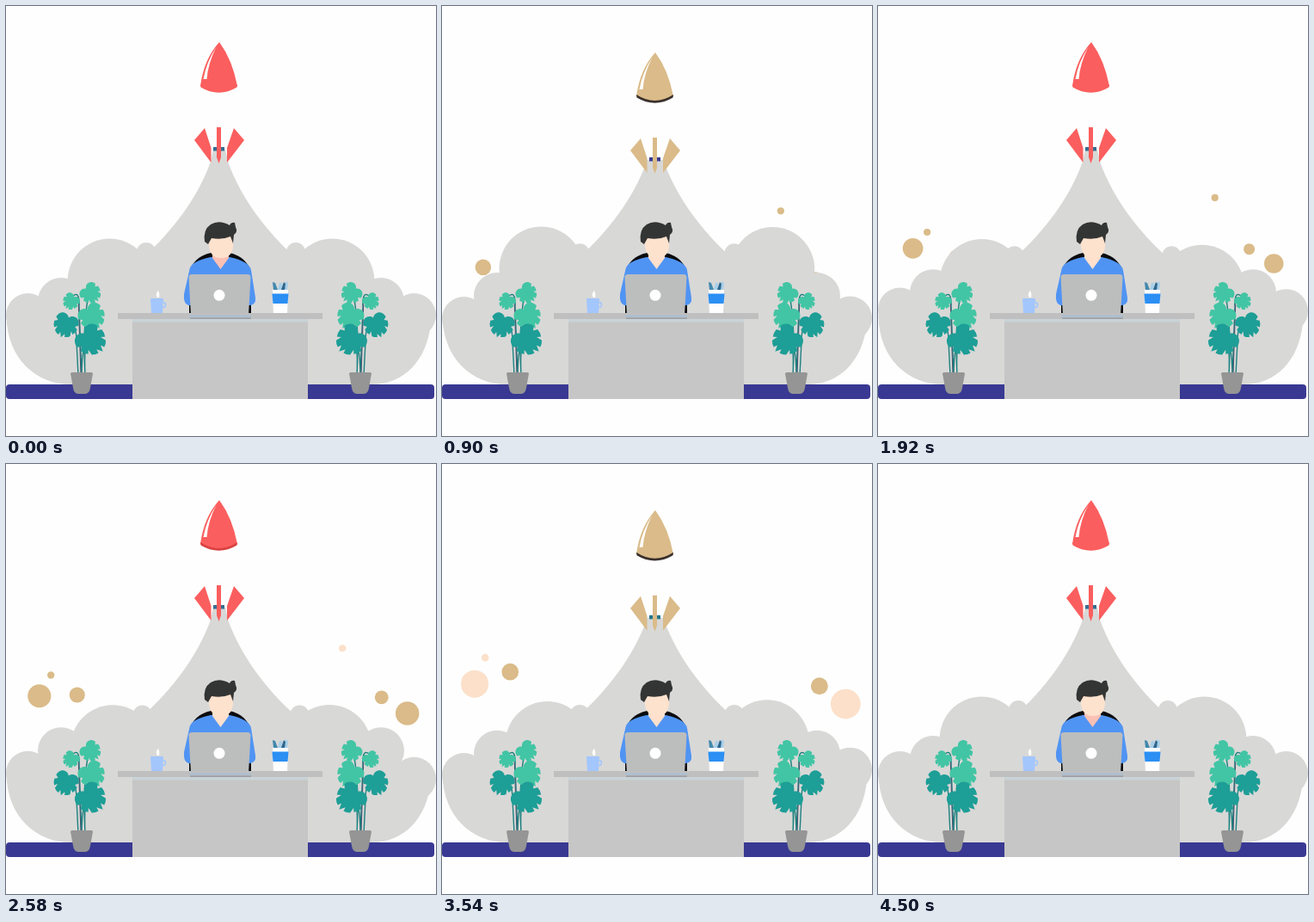
Recreate the animation shown at these times as an HTML page. Size 500 by 500 pixels, loop 4530 ms.

```html
<!DOCTYPE html>
<html lang="en">
<head>
<meta charset="utf-8">
<title>Rocket over a desk</title>
<style>
html, body { margin: 0; width: 100%; height: 100%; overflow: hidden; background: #fefefe; }
svg { display: block; width: 100vw; height: 100vh; }
</style>
</head>
<body>
<svg viewBox="0 0 500 500">
  <defs>
    <path id="leaf" d="M0-.65C-.25-1.05-.9-1-1-.35L-.75-.15-1.02 0Q-1 .3-.82 .52L-.6 .32-.68 .72Q-.5 .92-.28 .96L-.2 .7 0 1.1 .2 .7 .28 .96Q.5 .92 .68 .72L.6 .32 .82 .52Q1 .3 1.02 0L.75-.15 1-.35C.9-1 .25-1.05 0-.65Z"/>
    <g id="plant">
      <g fill="none" stroke="#1d807e" stroke-width="1.4">
        <path d="M96 336Q89 370 92 430M78 337Q86 331 85 350L88 430M98 362Q90 390 92 430M70 366Q82 366 82 390L84 430M97 385Q88 392 88 430"/>
        <path stroke="#43506d" stroke-width="1" d="M84 338L87 430"/>
      </g>
      <g fill="#42c5a4">
        <use href="#leaf" transform="translate(98.5 334) rotate(-45) scale(11.8)"/>
        <use href="#leaf" transform="translate(75.5 343.5) rotate(35) scale(9.4)"/>
        <use href="#leaf" transform="translate(100 361) rotate(-32) scale(15)"/>
      </g>
      <g fill="#1d9e96">
        <use href="#leaf" transform="translate(69.5 371) rotate(22) scale(14)"/>
        <use href="#leaf" transform="translate(99 388.5) rotate(-46) scale(17.2)"/>
      </g>
      <path fill="#959595" d="M75 427.500Q75 426 77 426H99Q101 426 101 427.500L98 444Q97 451 92 451H84Q79 451 78 444Z"/>
    </g>
  </defs>

  <g id="bubbles"></g>

  <g fill="#d8d8d7">
    <path d="M241 166H255L258 181C274 225 303 262 336 292V335H160V292C193 262 222 225 238 181Z"/>
    <path d="M.5 360C1 410 35 440 75 440H425C463 440 490 412 494 368L475 352 436 337 378 310 330 296H168L122 310 64 337 25 352Z"/>
    <g id="clouds"></g>
  </g>

  <g id="rocket">
    <rect x="236" y="100" width="24" height="67" fill="#fefefe"/>
    <rect id="nozzle" x="241" y="164" width="13" height="4.500"/>
    <g id="paint">
      <path d="M248 42Q230 62 226 93Q236 100 248 100Q260 100 269 93Q263 62 248 42Z"/>
      <path d="M231 142L219 156 238.500 182V165ZM265 142L277 156 257 182V165ZM245 141H250V176L247.500 183 245 176Z"/>
    </g>
    <path id="rim" d="M226 91Q247.500 105 269 91L268.500 94.500Q247.500 107 226.500 94.500Z"/>
    <path fill="#fefefe" d="M244.500 48Q233 65 229.500 85H233.500Q235 66 244.500 48Z"/>
  </g>

  <rect y="440" width="498" height="17" rx="4" fill="#393993"/>
  <use href="#plant"/>
  <use href="#plant" transform="matrix(-1 0 0 1 500 0)"/>

  <path fill="#0b0b0d" d="M213 357V312C217 277 281 277 285 312V357Z"/>
  <path fill="#5094f3" d="M238 292Q215 297 213.500 306L207 335Q206 346 212 348H284Q291 347 290 339L285 307Q283 297 260 292Z"/>
  <path id="neck" d="M240 286H259V293L249.500 306 240 293Z"/>
  <path fill="#fde2ce" d="M235 268H264V279Q263 293 250 293Q238 293 236 280Z"/>
  <path fill="#333534" d="M231 274Q229 260 238 254Q248 248 260 255Q262 251 266 252L267 257Q270 263 265 266L264 276 261 268Q252 272 239 270L235 277Z"/>
  <path fill="#bcbdbd" d="M216 312H281Q284 312 284.500 315L282 360H215L212.500 315Q213 312 216 312Z"/>
  <circle cx="248" cy="336.300" r="6.500" fill="#fff"/>

  <path fill="#fefefe" d="M176 339Q173 335 177 331Q179 334 178 339Z"/>
  <circle cx="182.500" cy="347.500" r="3" fill="none" stroke="#a3c6fd" stroke-width="1.500"/>
  <path fill="#a3c6fd" d="M168 340H183L182 357H169Z"/>

  <path fill="#4389ad" d="M311 330L310 321 313 322 316 330Z"/>
  <path fill="#a9cfe9" d="M316 330L318 322 321 322 322 330ZM323 330L325 320 328 322 327 330Z"/>
  <path fill="#2e668e" d="M320 330L323 321 325 323 324 330Z"/>
  <path fill="#fefefe" d="M310 330H328L327 359H311Z"/>
  <path fill="#2b8ff3" d="M309.500 334.500H328.500L327.500 346H310.500Z"/>

  <rect x="130" y="357" width="238" height="7" fill="#bfbfbf"/>
  <rect x="147" y="364" width="204" height="93" fill="#c6c6c6"/>
  <rect x="147" y="364" width="204" height="3.500" fill="#c9d3d7"/>
  <rect x="213" y="359.500" width="72" height="2" fill="#a7bfd5"/>
  <rect x="214" y="362.500" width="71" height="1.200" fill="#8f9499"/>
</svg>
<script>
const LOOP = 4530, STEP = 30, SPAN = 4500, FADE = 1900;
const RED = '#fb5e5e', TAN = '#dabb89', PEACH = '#fce0ca';
const $ = id => document.getElementById(id);
const clamp = v => Math.min(1, Math.max(0, v));
const ease = p => (1 - Math.cos(Math.PI * clamp(p))) / 2;
const mix = (a, b, p) => a + (b - a) * p;
const arc = t => Math.sin(Math.PI * t / SPAN);

// Falls to -14 at the crest, climbs to 10 at three crests, then settles at 0.
function heave(t, crest) {
  const low = 3 * crest;
  return -14 * ease(t / crest) + 24 * ease((t - crest) / (low - crest)) - 10 * ease((t - low) / (SPAN - low));
}

// Each puff sits `x` from the middle, its top at `y`; move gives [outward, down].
const puffs = [
  { x: 129.5, y: 270.5, r: 48.8, move: (t, crest) => [-0.37 * heave(t, crest), heave(t, crest)] },
  { x: 87, y: 275, r: 11, move: t => [4.5 * arc(t), 10 * arc(t) * t / SPAN] },
  { x: 186, y: 316, r: 27, move: t => [0, -10 * arc(t)] },
  { x: 224.5, y: 334, r: 25.5, move: (t, crest) => [0, 7 * arc(t) * Math.cos(2 * Math.PI * (t / crest - 1) / 2.5)] }
];
const clouds = [{ side: -1, crest: 900 }, { side: 1, crest: 750 }]
  .flatMap(half => puffs.map(puff => ({ ...half, ...puff })));

const bubbles = [
  { from: [62, 326], to: [38, 248], r: [7, 18.5], end: 4400 },
  { from: [116, 327], to: [50, 214], r: [3.8, 4.4], end: 4400 },
  { from: [192, 376], to: [79, 227], r: [7, 10.6], end: 4500 },
  { from: [398, 254], to: [391, 199], r: [4, 4.2], end: 3500 },
  { from: [384, 334], to: [469.5, 273], r: [4, 21], end: 4400 },
  { from: [371, 324], to: [439, 251], r: [2.5, 12], end: 4500 }
];

function addCircles(list, parent) {
  for (const item of list) {
    item.el = document.createElementNS('http://www.w3.org/2000/svg', 'circle');
    parent.append(item.el);
  }
}

function set(el, attrs) {
  for (const name in attrs) el.setAttribute(name, attrs[name]);
}

function drawRocket(t) {
  const cycle = t % 2700;
  const dip = cycle < 1800 ? 6 * (1 - Math.cos(cycle * Math.PI / 900)) : 0;
  const low = dip > 7.8;
  set($('rocket'), { transform: `translate(0 ${dip})` });
  set($('paint'), { fill: low ? TAN : RED });
  set($('rim'), { fill: low ? '#3a302c' : cycle > 2100 ? '#d94343' : RED });
  set($('nozzle'), { fill: low ? (t < 2700 ? '#393993' : '#23788b') : '#376d92' });
}

function drawCloud({ el, side, crest, x, y, r, move }, t) {
  const [out, down] = move(t, crest);
  set(el, { cx: 250 + side * (x + out), cy: y + down + r, r });
}

function drawBubble({ el, from, to, r, end }, t) {
  const u = t / SPAN, left = clamp((end - t) / FADE);
  set(el, {
    cx: mix(from[0], to[0], 1 - (1 - u) ** 4),
    cy: mix(from[1], to[1], 1 - (1 - u) ** 1.5),
    r: mix(...r, u) * clamp(t / 600),
    fill: left < 0.5 ? PEACH : TAN,
    opacity: clamp(left * 2.4)
  });
}

function draw(t) {
  drawRocket(t);
  set($('neck'), { fill: arc(t) < 0.2 ? '#fbc0b4' : '#fee0cc' });
  for (const cloud of clouds) drawCloud(cloud, t);
  for (const bubble of bubbles) drawBubble(bubble, t);
}

addCircles(clouds, $('clouds'));
addCircles(bubbles, $('bubbles'));

const start = performance.now();
function tick() {
  const t = (performance.now() - start) % LOOP;
  draw(Math.floor(t / STEP) * STEP);
  requestAnimationFrame(tick);
}
tick();
</script>
</body>
</html>
```
